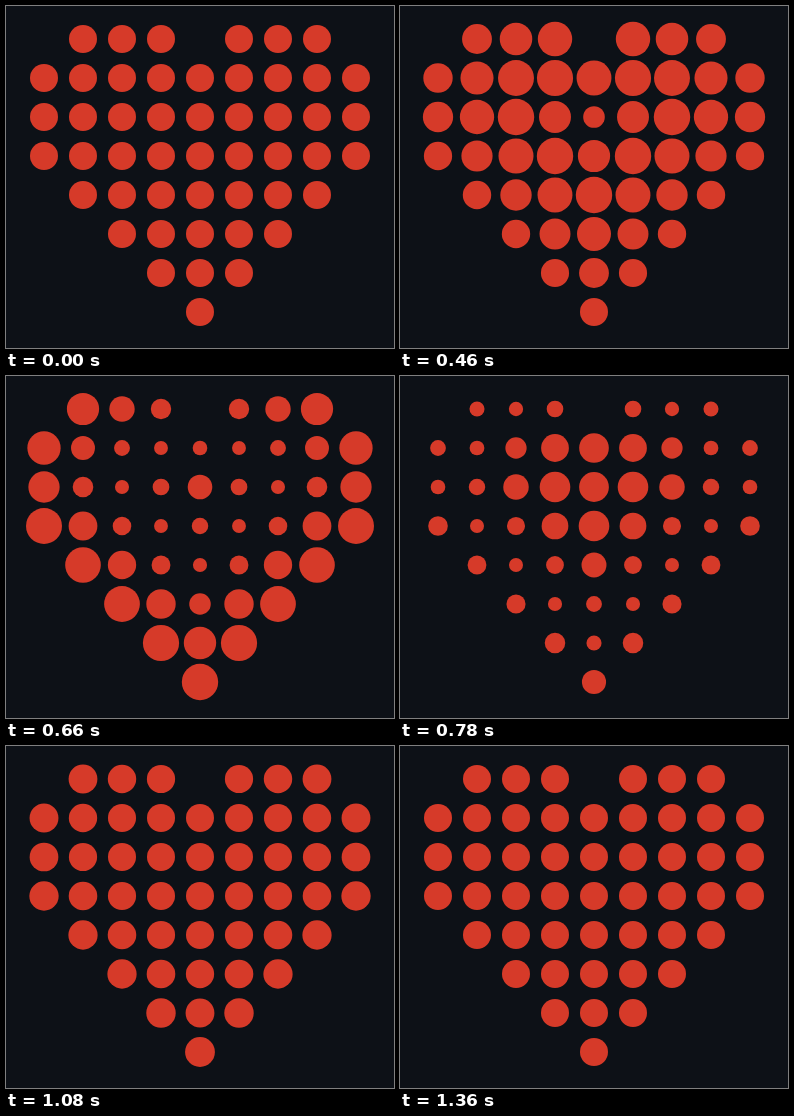
An HTML page that plays this animation: 388x342 px, repeating every 1620 ms.

```html
<!DOCTYPE html>
<html lang="en">
<head>
<meta charset="utf-8">
<title>Heart ripple</title>
<style>
  html, body { margin: 0; width: 100%; height: 100%; overflow: hidden; background: #0d1117; }
  svg { display: block; width: 388px; height: 342px; }
  circle { fill: #d63a29; }
</style>
</head>
<body>
<svg id="stage" viewBox="0 0 388 342"></svg>
<script>
const LOOP = 1620, TICK = 20, PITCH = 39, RADIUS = 14, LAG = 66;
const ROWS = [
  '.###.###.',
  '#########',
  '#########',
  '#########',
  '.#######.',
  '..#####..',
  '...###...',
  '....#....'
];

// Radius offsets of one pulse: swell, shrink, overshoot, rest.
const KEYS = [[125, 0], [330, 4.2], [538, -7], [712, 1.2], [1030, 0]];
const sine = p => (1 - Math.cos(Math.PI * p)) / 2;
const settle = p => 1 - (1 - p) ** 3;

function pulse(time) {
  if (time <= KEYS[0][0]) return 0;
  for (let i = 1; i < KEYS.length; i++) {
    const [t0, v0] = KEYS[i - 1], [t1, v1] = KEYS[i];
    if (time < t1) {
      const ease = i === KEYS.length - 1 ? settle : sine;
      return v0 + (v1 - v0) * ease((time - t0) / (t1 - t0));
    }
  }
  return 0;
}

// Heart-shaped wavefront: rounded above the origin, pointed below it.
function distance(dx, dy) {
  const power = dy < 0 ? 2 : 1.15;
  const y = Math.abs(dy) * (dy < 0 ? 1.4 : 1.03);
  return Math.max(0.2, (Math.abs(dx) ** power + y ** power) ** (1 / power));
}

const stage = document.getElementById('stage');
const dots = [];
ROWS.forEach((line, row) => [...line].forEach((mark, col) => {
  if (mark !== '#') return;
  const node = document.createElementNS('http://www.w3.org/2000/svg', 'circle');
  node.setAttribute('cx', 38 + col * PITCH);
  node.setAttribute('cy', 33 + row * PITCH);
  stage.appendChild(node);
  const d = distance(col - 4, row - 2);
  dots.push({ node, delay: d * LAG, gain: 1 + 0.3 * Math.exp(-d * d) });
}));

function draw(time) {
  for (const { node, delay, gain } of dots) {
    node.setAttribute('r', (RADIUS + gain * pulse(time - delay)).toFixed(2));
  }
}

const start = performance.now();
function loop(now) {
  const time = Math.max(0, now - start) % LOOP;
  draw(Math.floor(time / TICK) * TICK);
  requestAnimationFrame(loop);
}
draw(0);
requestAnimationFrame(loop);
</script>
</body>
</html>
```
